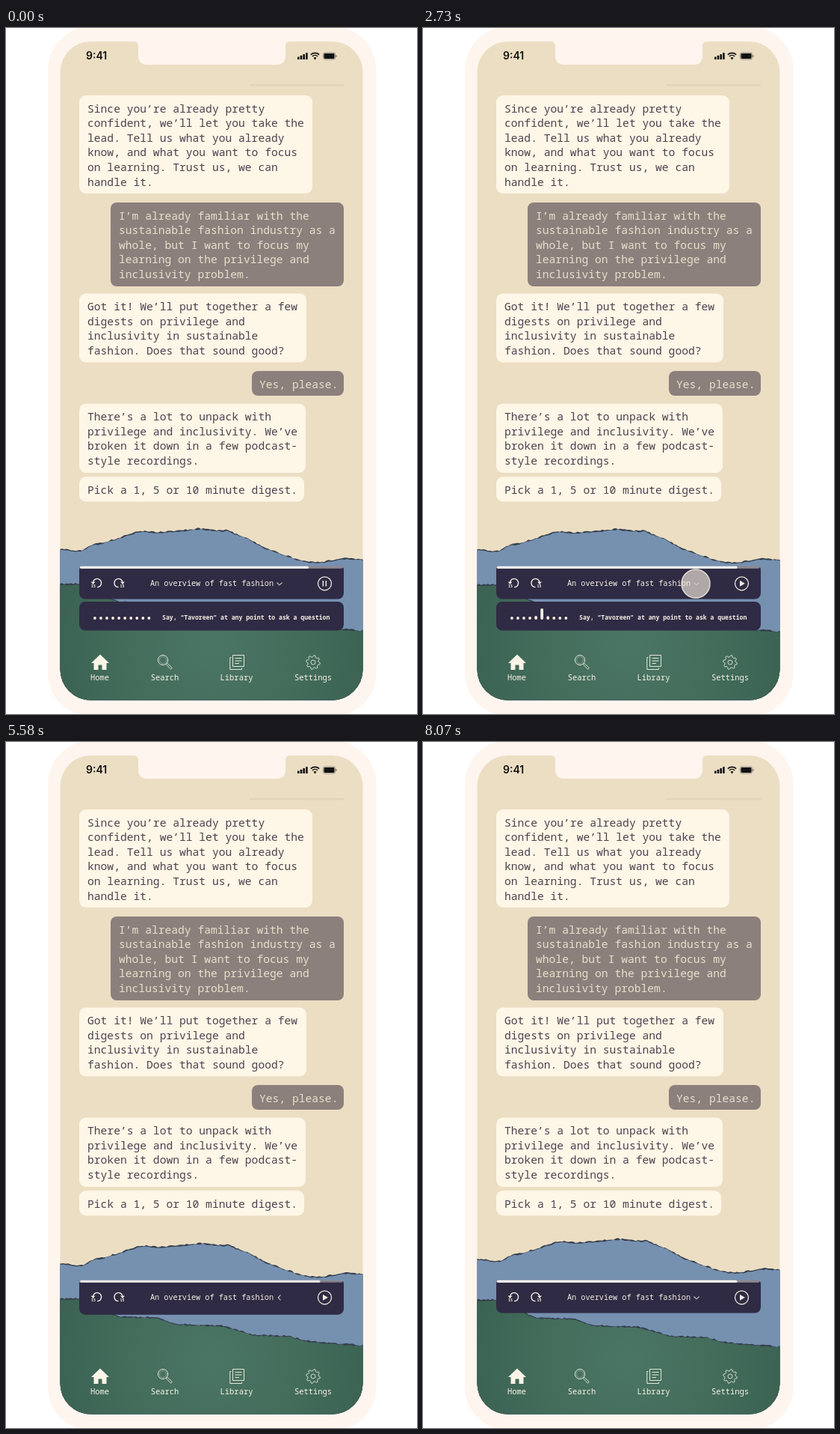
These frames come from a looping animation (550x916 px, 8.1 s). An HTML page with a canvas:

```html
<!DOCTYPE html>
<html lang="en">
<head>
<meta charset="utf-8">
<title>Audio digest player</title>
<style>
html, body { margin: 0; width: 100%; height: 100%; overflow: hidden; background: #fff; }
canvas, svg { position: absolute; left: 0; top: 0; width: 550px; height: 916px; }
text { font-family: "Noto Sans Mono", "DejaVu Sans Mono", monospace; white-space: pre; }
.clock { font-family: Inter, Roboto, sans-serif; }
</style>
</head>
<body>
<canvas id="stage"></canvas>
<svg id="words" viewBox="0 0 550 916"></svg>
<script>
const LOOP = 8100, W = 550, H = 916;
const CREAM = '#fef6e6', NAVY = '#2f2b44', INK = '#4c4250', PALE = '#e9dfcd';
const canvas = document.getElementById('stage');
const words = document.getElementById('words');
const g = canvas.getContext('2d');
const dpr = window.devicePixelRatio || 1;
canvas.width = W * dpr;
canvas.height = H * dpr;
g.scale(dpr, dpr);

const clamp = v => Math.max(0, Math.min(1, v));
const mix = (a, b, p) => a + (b - a) * p;
const ramp = (t, a, b) => clamp((t - a) / (b - a));
const ease = (t, a, b) => { const p = ramp(t, a, b); return p * p * (3 - 2 * p); };

// ---- text ----
function label(str, x, y, size, fill, opt = {}) {
  const el = document.createElementNS('http://www.w3.org/2000/svg', 'text');
  const attrs = { x, y, fill, 'font-size': size, 'font-weight': opt.weight || 400,
    'text-anchor': opt.anchor || 'start', class: opt.cls || '' };
  for (const k in attrs) el.setAttribute(k, attrs[k]);
  el.textContent = str;
  words.appendChild(el);
  return el;
}

const bubbles = [
  { box: [98, 90, 312, 131], lines: ['Since you’re already pretty', 'confident, we’ll let you take the',
    'lead. Tell us what you already', 'know, and what you want to focus', 'on learning. Trust us, we can', 'handle it.'] },
  { box: [140, 233, 312, 112], own: true, lines: ['I’m already familiar with the',
    'sustainable fashion industry as a', 'whole, but I want to focus my',
    'learning on the privilege and', 'inclusivity problem.'] },
  { box: [98, 354.5, 304, 92], lines: ['Got it! We’ll put together a few', 'digests on privilege and',
    'inclusivity in sustainable', 'fashion. Does that sound good?'] },
  { box: [329, 458, 123, 33], own: true, lines: ['Yes, please.'] },
  { box: [98, 501.5, 303, 92.5], lines: ['There’s a lot to unpack with', 'privilege and inclusivity. We’ve',
    'broken it down in a few podcast-', 'style recordings.'] },
  { box: [98, 599, 301, 33.5], lines: ['Pick a 1, 5 or 10 minute digest.'] }
];
for (const b of bubbles) {
  const [x, y] = b.box;
  b.lines.forEach((s, i) => label(s, x + 11 - (b.lines.length < 2 && b.own ? 1 : 0), y + 22.5 + i * 19.6, 14.65, b.own ? '#eadfca' : INK));
}
label('9:41', 107, 42, 14, '#111', { weight: 600, cls: 'clock' });
label('An overview of fast fashion', 193, 745, 10.2, '#f6f0e4', { weight: 500 });
const hint = label('Say, “Tavoreen” at any point to ask a question', 209, 789.5, 8.15, '#f6f0e4', { weight: 700 });
const clocks = [
  label('09:34', 114.5, 787.5, 8, '#f6f0e4', { weight: 600 }),
  label('00:26', 436, 787.5, 8, '#f6f0e4', { weight: 600, anchor: 'end' })
];
for (const [s, x] of [['Home', 125.5], ['Search', 212.5], ['Library', 308.5], ['Settings', 411]])
  label(s, x, 871, 10.45, '#fbf5e8', { weight: 500, anchor: 'middle' });
for (const x of [117, 155.5]) label('15', x, 747, 5, '#f6f0e4', { weight: 700, anchor: 'middle' });

// ---- shapes ----
function box(x, y, w, h, r, fill) {
  g.beginPath();
  g.roundRect(x, y, w, h, r);
  g.fillStyle = fill;
  g.fill();
}
function disc(x, y, r, fill) {
  g.beginPath();
  g.arc(x, y, r, 0, 7);
  g.fillStyle = fill;
  g.fill();
}
function line(pts, color, width = 1, close = false) {
  g.beginPath();
  pts.forEach(p => g.lineTo(p[0], p[1]));
  if (close) g.closePath();
  g.strokeStyle = color;
  g.lineWidth = width;
  g.stroke();
}
function poly(pts, fill) {
  g.beginPath();
  pts.forEach(p => g.lineTo(p[0], p[1]));
  g.fillStyle = fill;
  g.fill();
}
function ring(x, y, r, color, width, a = 0, b = Math.PI * 2) {
  g.beginPath();
  g.arc(x, y, r, a, b);
  g.strokeStyle = color;
  g.lineWidth = width;
  g.stroke();
}

// ---- torn paper hills ----
const noise = n => { const v = Math.sin(n * 12.9898) * 43758.5453; return v - Math.floor(v) - 0.5; };
const blueRidge = [[50, 696], [72, 697], [100, 699.5], [113, 692], [135, 687], [160, 679], [178, 672.5], [200, 674.5],
  [235, 672], [260, 669.5], [280, 672], [296, 672], [325, 683], [345, 695], [365, 702], [390, 711],
  [410, 714.5], [425, 714], [450, 709], [500, 712]];
const greenRidge = [[50, 744], [98, 744], [120, 752], [142, 764], [152, 768], [200, 769], [230, 778],
  [290, 780], [330, 792], [380, 794], [400, 800], [430, 803], [460, 805], [500, 809]];

function heightAt(pts, x) {
  let i = 1;
  while (i < pts.length - 1 && pts[i][0] < x) i++;
  const [a, b] = [pts[i - 1], pts[i]];
  return mix(a[1], b[1], clamp((x - a[0]) / (b[0] - a[0])));
}
function sheet(pts, dx, dy, rough, seed, fill) {
  const out = [[50, 920]];
  for (let x = 60; x <= 490; x += 3)
    out.push([x + dx, heightAt(pts, x) + dy + noise(x + seed) * rough]);
  out.push([500, 920]);
  poly(out, fill);
}
function hill(pts, dx, dy, seed, fill) {
  sheet(pts, dx, dy - 1, 2, seed, '#343f4c');
  sheet(pts, dx, dy + 0.5, 1.6, seed + 500, fill);
}

// value of a slow drift, from [time, value] pairs
function drift(keys, t) {
  for (let i = 1; i < keys.length; i++)
    if (t <= keys[i][0]) return mix(keys[i - 1][1], keys[i][1], ramp(t, keys[i - 1][0], keys[i][0]));
  return keys[keys.length - 1][1];
}
const blueY = [[0, -0.5], [1500, -1], [2730, 0], [4200, 1], [6390, 0], [8100, -5.5]];
const blueX = [[0, 0], [1530, 4], [2730, 0], [4260, 0], [6390, 3], [8100, 3]];
const greenY = [[0, -1], [1530, 0.5], [2730, 0], [6390, 0], [8100, 1.6]];

function hills(t) {
  hill(blueRidge, drift(blueX, t), drift(blueY, t), 3, '#7690b0');
  const green = g.createRadialGradient(275, 825, 10, 275, 825, 215);
  green.addColorStop(0, '#4a7463');
  green.addColorStop(0.55, '#436c5b');
  green.addColorStop(1, '#3b6252');
  hill(greenRidge, 0, drift(greenY, t), 77, green);
}

// ---- phone ----
function notch() {
  g.beginPath();
  g.moveTo(171, 17);
  g.lineTo(171, 18);
  g.quadraticCurveTo(177, 18, 177, 24);
  g.lineTo(177, 37);
  g.quadraticCurveTo(177, 49, 189, 49);
  g.lineTo(362, 49);
  g.quadraticCurveTo(374, 49, 374, 37);
  g.lineTo(374, 24);
  g.quadraticCurveTo(374, 18, 380, 18);
  g.lineTo(380, 17);
  g.fillStyle = '#fff5ee';
  g.fill();
}
function statusIcons() {
  for (let i = 0; i < 4; i++) {
    const h = 3.5 + i * 1.8;
    box(390 + i * 3.7, 42 - h, 2.6, h, 0.6, '#111');
  }
  const a = Math.PI * 1.27, b = Math.PI * 1.73;
  ring(413.5, 42, 8.6, '#111', 1.7, a, b);
  ring(413.5, 42, 5.5, '#111', 1.6, a, b);
  g.beginPath();
  g.moveTo(413.5, 42.5);
  g.arc(413.5, 42, 3, a, b);
  g.fillStyle = '#111';
  g.fill();
  g.beginPath();
  g.roundRect(424.5, 33, 16, 9, 2.4);
  g.strokeStyle = '#777';
  g.lineWidth = 0.8;
  g.stroke();
  box(425.5, 34, 14, 7, 1.4, '#111');
  box(441.4, 36, 1.2, 3, 0.6, '#777');
}
function navIcons() {
  const c = '#fbf5e8', s = '#e6e8d8';
  poly([[126, 836.5], [138, 848], [134.5, 848], [134.5, 857], [128.5, 857], [128.5, 850.5],
    [123.5, 850.5], [123.5, 857], [117.5, 857], [117.5, 848], [114, 848]], c);
  ring(210, 844, 6.6, s, 1);
  ring(210, 844, 4.6, 'rgba(230,232,216,.55)', 0.7);
  line([[214.3, 849.7], [220.6, 856.3], [222.4, 854.4], [215.7, 848.2]], s, 0.9, true);
  line([[303.5, 837.5], [318.5, 837.5], [318.5, 852.5], [303.5, 852.5]], s, 1, true);
  line([[301.5, 840.5], [299.8, 840.5], [299.8, 856.5], [315.5, 856.5], [315.5, 854.5]], s, 1);
  for (const [y, x] of [[841.5, 315.5], [845, 315.5], [848.5, 312]]) line([[306.5, y], [x, y]], s, 1);
  const gear = [];
  for (let i = 0; i < 32; i++) {
    const a = (i + 0.5) / 32 * Math.PI * 2, r = i % 4 < 2 ? 9.4 : 7.2;
    gear.push([411 + Math.cos(a) * r, 847 + Math.sin(a) * r]);
  }
  line(gear, s, 0.9, true);
  ring(411, 847, 3, s, 0.9);
}

// ---- player ----
function skipIcon(x, dir) {
  g.save();
  g.translate(x, 741);
  g.scale(dir, 1);
  ring(1, 0, 5.6, '#f6f0e4', 1.4, Math.PI * 1.08, Math.PI * 2.5);
  poly([[-7.4, -1.6], [-1.6, -1.6], [-4.6, 2]], '#f6f0e4');
  g.restore();
}
function playButton(playing) {
  const c = '#f2ecdf';
  ring(426.5, 741.8, 9, c, 1.3);
  if (playing) {
    box(423.6, 738, 1.5, 7.6, 0, c);
    box(427.6, 738, 1.5, 7.6, 0, c);
  } else poly([[424, 737.8], [430.8, 741.8], [424, 745.8]], c);
}
function chevron(turn) {
  g.save();
  g.translate(366, 742);
  g.rotate(turn * Math.PI);
  line([[-3.5, -1.5], [0, 1.8], [3.5, -1.5]], '#cfc8c4', 1.1);
  g.restore();
}
function levels(t) {
  const head = (t * 0.01515 - 0.2) % 17.2 - 1;
  for (let i = 0; i < 10; i++) {
    const d = i - head + 0.8;
    const tall = 4 + 11 * Math.exp(-d * d * 2.6) * ramp(t, 0, 90);
    box(117 + i * 8.05, 790 - tall, 3.8, tall, 1.9, '#f6f0e4');
  }
}
function touch(x, y, t, start) {
  const p = ease(t, start, start + 130) * (1 - ease(t, start + 250, start + 400));
  if (p <= 0) return;
  g.globalAlpha = p;
  disc(x, y, mix(14, 19, p), 'rgba(212,203,196,.78)');
  ring(x, y, mix(14, 19, p), '#e6ded2', 1.5);
  g.globalAlpha = 1;
}
function player(t) {
  const open = ease(t, 2850, 3250) - ease(t, 5150, 5650);
  const turn = ease(t, 2900, 3150) - ramp(t, 5480, 5680);
  const hintOn = 1 - ease(t, 2850, 3050);
  const top = mix(720, 718.5, open), bottom = mix(762.5, 805, open);
  const thin = clamp(1 - open * 3), full = clamp(open * 2 - 1);

  if (hintOn > 0) {
    g.globalAlpha = hintOn;
    box(98, 766, 354, 38.5, 8, NAVY);
    levels(t);
    g.globalAlpha = 1;
  }
  const r = mix(3, 8, open);
  box(98, top, 354, bottom - top, [r, r, 8, 8], NAVY);

  g.globalAlpha = thin;
  box(99, 718.7, 351, 3, 1.5, '#8f8890');
  box(99, 718.7, mix(306, 321.5, ramp(t, 0, 1050)), 3, 1.5, '#fffdf8');
  g.globalAlpha = full;
  box(114.5, 769, 321, 6, 2, '#8c868f');
  box(114.5, 769, 285, 6, 2, CREAM);
  disc(399, 772, 6.8, CREAM);
  g.globalAlpha = 1;

  hint.setAttribute('opacity', hintOn);
  clocks.forEach(c => c.setAttribute('opacity', full));

  skipIcon(121, 1);
  skipIcon(151.5, -1);
  chevron(turn);
  touch(426.5, 742, t, 850);
  touch(365, 742, t, 2560);
  touch(365, 742, t, 4880);
  playButton(t < 1050);
}

function draw(t) {
  g.fillStyle = '#fff';
  g.fillRect(0, 0, W, H);
  box(56, -2, 439.5, 921, 58, '#fef5ee');
  g.save();
  g.beginPath();
  g.roundRect(72.5, 18, 405, 879.5, 41);
  g.clip();
  g.fillStyle = '#ecdec3';
  g.fillRect(72, 18, 406, 880);
  box(326, 75, 126, 2.5, 1.2, '#e3d4b8');
  for (const b of bubbles) box(...b.box, b.own ? 8 : 9, b.own ? '#8c807d' : CREAM);
  hills(t);
  player(t);
  navIcons();
  g.restore();
  notch();
  statusIcons();
}

const begin = performance.now();
function tick() {
  draw((performance.now() - begin) % LOOP);
  requestAnimationFrame(tick);
}
tick();
</script>
</body>
</html>
```
